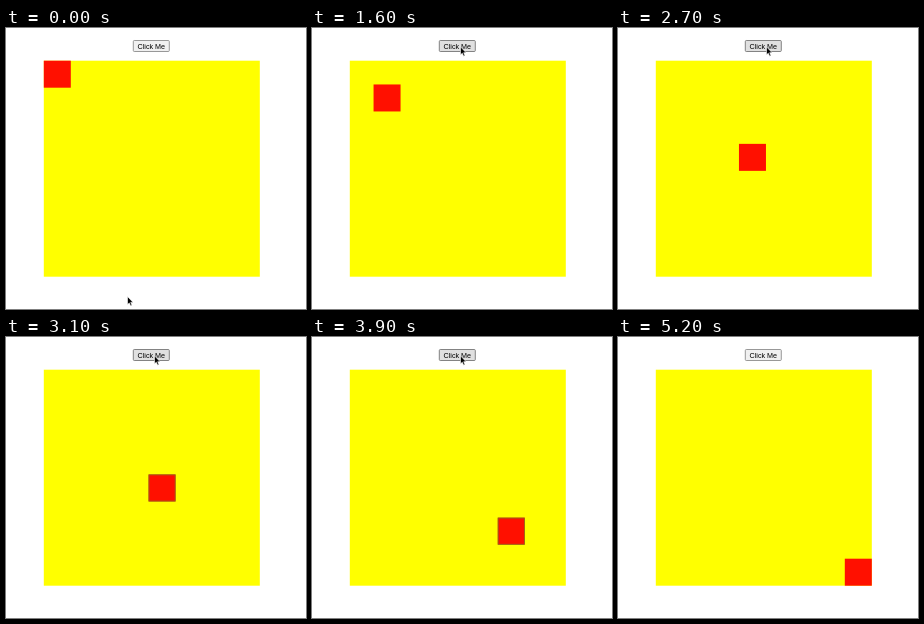
An HTML page for the animation above (5800 ms loop, 300 px wide and 281 px high).

```html
<!DOCTYPE html>
<html lang="en">
<head>
<meta charset="utf-8">
<title>Moving square</title>
<style>
html, body { margin: 0; width: 100%; height: 100%; overflow: hidden; background: #fff; }
svg { display: block; width: 300px; height: 281px; }
text { font: 7.2px "Liberation Sans", Arial, sans-serif; text-anchor: middle; }
</style>
</head>
<body>
<svg viewBox="0 0 300 281">
  <rect id="button" x="127.3" y="12.5" width="36" height="11" rx="1" stroke-width=".8"/>
  <text x="145.3" y="20.6">Click Me</text>
  <rect x="37.8" y="32.7" width="216" height="216" fill="#ff0"/>
  <g id="square">
    <rect width="27" height="27" fill="#ff1000"/>
    <rect id="edge" x=".4" y=".4" width="26.2" height="26.2" fill="none" stroke="#85701c" stroke-width=".8"/>
  </g>
  <path id="cursor" d="M0 0V8L1.8 6.4L3.2 9.4L4.5 8.8L3.2 5.9H5.6Z" stroke="#fff" stroke-width=".6"/>
</svg>
<script>
const LOOP = 5800, STEP = 100;
const START = 1160, SPEED = 0.054, TRAVEL = 189;
const byId = id => document.getElementById(id);
const button = byId('button'), square = byId('square'), edge = byId('edge'), cursor = byId('cursor');

// Pointer tip: time, x, y
const pointerPath = [
  [0, 121.5, 268.5], [600, 145.5, 12.5], [700, 147, 15], [800, 148.5, 18.8],
  [4400, 148.5, 18.8], [4600, 148, 12.4], [4900, 148, 12.4], [5200, 148, -14]
];

function pointerAt(t) {
  const i = pointerPath.findIndex(p => p[0] > t);
  if (i < 0) return pointerPath[pointerPath.length - 1].slice(1);
  const [t0, x0, y0] = pointerPath[i - 1], [t1, x1, y1] = pointerPath[i];
  const p = (t - t0) / (t1 - t0);
  const k = i === 1 ? p * p * (3 - 2 * p) : p;
  return [x0 + (x1 - x0) * k, y0 + (y1 - y0) * k];
}

const place = (node, x, y) => node.setAttribute('transform', `translate(${x} ${y})`);

function draw(time) {
  const t = Math.floor((time % LOOP) / STEP) * STEP;
  const shift = Math.min(TRAVEL, Math.max(0, (t - START) * SPEED));
  place(square, 37.8 + shift, 32.7 + shift);
  edge.setAttribute('visibility', t >= 2900 && t < 4700 ? 'visible' : 'hidden');
  place(cursor, ...pointerAt(t));
  const hover = t >= 600 && t < 5000;
  button.setAttribute('fill', hover && t >= 1200 ? '#e0e0e0' : '#f0f0f0');
  button.setAttribute('stroke', hover ? '#686868' : '#808080');
}

const begin = performance.now();
function tick() {
  draw(performance.now() - begin);
  requestAnimationFrame(tick);
}
tick();
</script>
</body>
</html>
```
